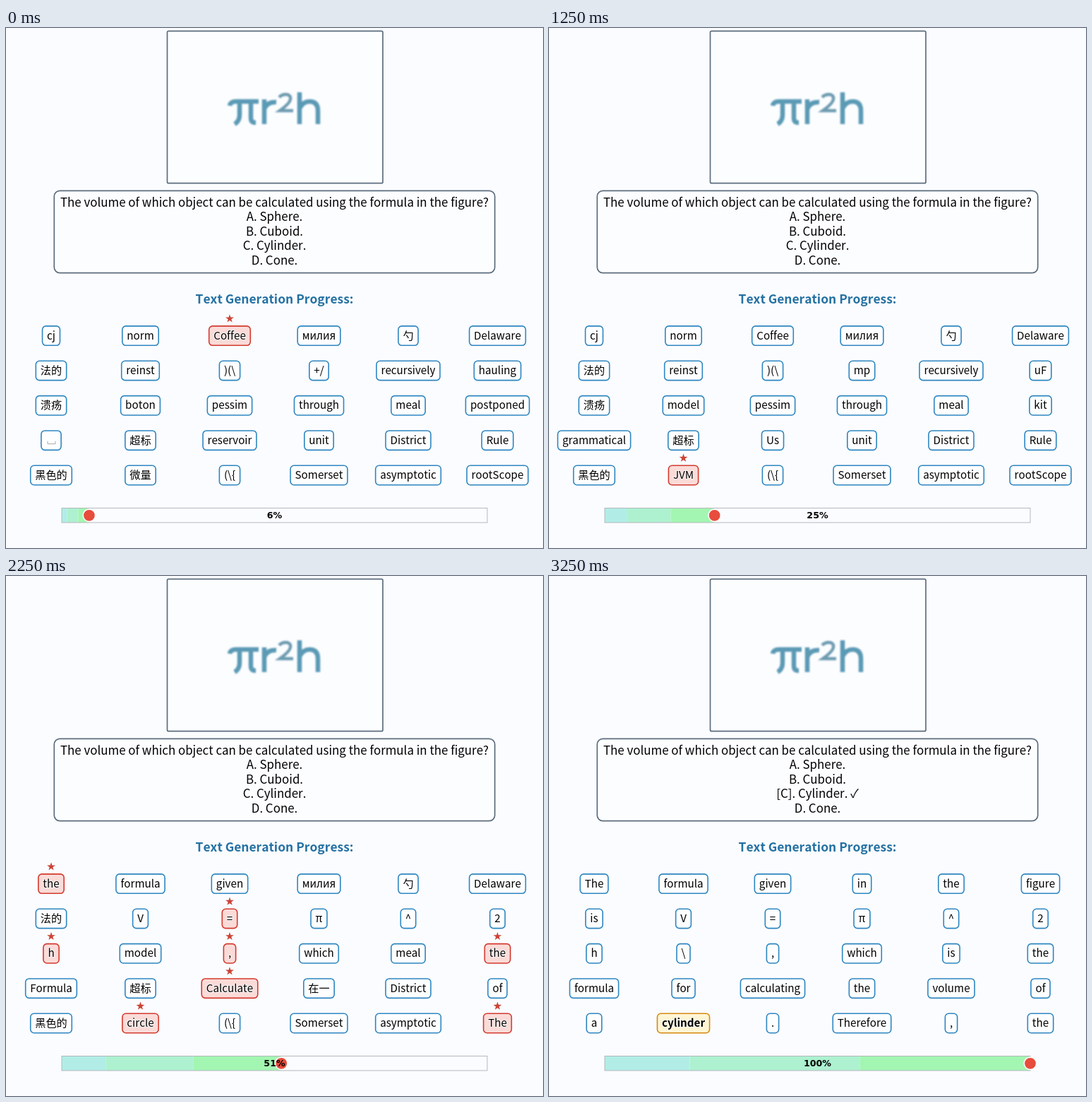
An HTML page for the animation above (8.5 s loop, 761 px wide and 736 px high).

```html
<!DOCTYPE html>
<html lang="en">
<head>
<meta charset="utf-8">
<style>
  html, body { margin: 0; width: 100%; height: 100%; overflow: hidden; background: #fbfcff; }
  svg { display: block; width: 761px; height: 736px; }
  text {
    font: 15.2px "Noto Sans CJK SC", "Noto Sans CJK JP", "Noto Sans CJK", sans-serif;
    font-kerning: none; font-variant-ligatures: none; text-anchor: middle;
  }
  .question text { font-size: 16.9px; }
  .heading { font-size: 17.45px; font-weight: bold; fill: #2471a3; }
  .percent { font: bold 12.65px "DejaVu Sans", sans-serif; }
  .frame { fill: #fcfdff; stroke: #5d6d7e; stroke-width: 1.7; }
  .formula { fill: none; stroke: #5b9ab5; stroke-width: 6.5; filter: blur(.8px); }
  .token rect { fill: #fdfeff; stroke: #2e86c1; stroke-width: 1.6; }
  .token text { stroke: #fff; stroke-width: 2px; stroke-opacity: .7; paint-order: stroke; }
  .token path { fill: #cb4335; }
  .token .blank { fill: none; stroke: #aaa; }
  .new rect { fill: #fadbd8; stroke: #d43a2f; }
  .answer rect { fill: #fef5d4; stroke: #d68910; }
  .answer text { font-weight: bold; }
</style>
</head>
<body>
<svg viewBox="0 0 761 736">
  <rect class="frame" x="228.5" y="4.3" width="305.5" height="215.4" rx="2"/>
  <g class="formula">
    <path d="M317 110Q318 104 326 104H358M331 104V123Q331 132 324 136M347 104V128Q347 134 354 134"/>
    <path d="M366 101V136M366 115Q370 104 383 105"/>
    <path d="M387 98Q391 94 396 94Q404 94 403 101Q402 107 388 117H407" stroke="#6d9bb0" stroke-width="4.5"/>
    <path d="M416 91V136M416 114Q421 104 430 104Q442 104 442 117V136"/>
  </g>
  <rect class="frame" x="68.3" y="230.3" width="624.4" height="116.4" rx="8"/>
  <g class="question"></g>
  <text class="heading" x="380.5" y="390">Text Generation Progress:</text>
  <g id="tokens"></g>
  <g id="bands"></g>
  <rect x="79" y="679.5" width="603" height="20.5" fill="none" stroke="#b3b8bd"/>
  <circle id="knob" cy="689.8" r="8.7" fill="#e74c3c" stroke="#fff" stroke-width="1.6"/>
  <text class="percent" id="percent" x="380.5" y="693.6"></text>
</svg>
<script>
const STEP = 250, LOOP = 8500, TOTAL = 31, ANSWER = 25, BLANK = '_';
const BAR = { x: 79, y: 680, w: 603, h: 20 };
const BANDS = [[0, .2, '#b1ede6'], [.2, .4, '#adf1d0'], [.6, .4, '#a3f6b1']];

const start = `cj norm Coffee милия 勺 Delaware
  法的 reinst )(\\ +/ recursively hauling
  溃疡 boton pessim through meal postponed
  ${BLANK} 超标 reservoir unit District Rule
  黑色的 微量 (\\{ Somerset asymptotic rootScope`.split(/\s+/);

// Each step: decoded count, then the cells that receive a new word.
const steps = [
  [2, { 2: 'Coffee' }],
  [3, { 11: 'uF' }],
  [4, { 17: 'kit', 18: 'grammatical', 20: 'Us' }],
  [6, { 9: 'mp' }],
  [7, { 13: 'model' }],
  [8, { 25: 'JVM' }],
  [13, { 7: 'V', 18: 'Formula', 20: 'stimulus' }],
  [14, { 10: '^' }],
  [15, { 1: 'formula', 2: 'given', 9: 'π', 11: '2', 15: 'which', 21: '在一', 23: 'of' }],
  [16, { 0: 'the', 8: '=', 12: 'h', 14: ',', 17: 'the', 20: 'Calculate', 25: 'circle', 29: 'The' }],
  [17, { 0: 'The', 6: 'is', 20: 'calculating', 24: 'a', 25: 'cylinder', 26: '.', 27: 'Therefore', 28: ',', 29: 'the' }],
  [18, { 3: 'in', 4: 'the', 16: 'is', 18: 'formula', 19: 'for', 22: 'volume' }],
  [19, { 5: 'figure', 13: '\\', 21: 'the' }],
  [TOTAL, {}]
];

const $ = s => document.querySelector(s);
const starPath = (x, y) => 'M' + Array.from({ length: 10 }, (_, i) => {
  const a = i * Math.PI / 5, r = i % 2 ? 2.4 : 6.2;
  return `${x + r * Math.sin(a)} ${y - r * Math.cos(a)}`;
}).join('L') + 'Z';

function tokenMarkup(word, i, kind) {
  const x = 64 + i % 6 * 126.5, y = 435.6 + Math.floor(i / 6) * 49.35;
  const label = word === BLANK
    ? `<path class="blank" d="M${x - 5} ${y + 1}v4h11v-4M${x - 16} ${y + 4}h2m28 0h2"/>`
    : `<text x="${x}" y="${y + 5}">${word}</text>`;
  const star = kind === 'new' ? `<path d="${starPath(x, y - 24.2)}"/>` : '';
  return `<g class="token ${kind}" data-x="${x}"><rect y="${y - 13.7}" height="27.4" rx="5"/>${label}${star}</g>`;
}

function show(n) {
  const words = Object.assign([...start], ...steps.slice(0, n + 1).map(s => s[1]));
  const [count, fresh] = steps[n], done = count === TOTAL, part = count / TOTAL;

  $('.question').innerHTML = [
    'The volume of which object can be calculated using the formula in the figure?',
    'A. Sphere.', 'B. Cuboid.', done ? '[C]. Cylinder. ✓' : 'C. Cylinder.', 'D. Cone.'
  ].map((line, i) => `<text x="380.5" y="${253 + i * 20.4}">${line}</text>`).join('');

  $('#tokens').innerHTML = words.map((word, i) =>
    tokenMarkup(word, i, done && i === ANSWER ? 'answer' : i in fresh ? 'new' : '')).join('');
  for (const g of $('#tokens').children) {
    const label = g.querySelector('text'), box = g.firstChild;
    const w = (label ? label.getComputedTextLength() : 15.2) + 13;
    box.setAttribute('x', g.dataset.x - w / 2);
    box.setAttribute('width', w);
  }

  const fill = BAR.w * part;
  $('#bands').innerHTML = BANDS.map(([from, size, color]) =>
    `<rect x="${BAR.x + fill * from}" y="${BAR.y}" width="${fill * size}" height="${BAR.h}" fill="${color}"/>`).join('');
  $('#knob').setAttribute('cx', BAR.x + fill);
  $('#percent').textContent = Math.floor(part * 100) + '%';
}

let shown = -1;
function tick() {
  const n = Math.min(Math.floor(performance.now() % LOOP / STEP), steps.length - 1);
  if (n !== shown) show(shown = n);
  requestAnimationFrame(tick);
}
tick();
</script>
</body>
</html>
```
